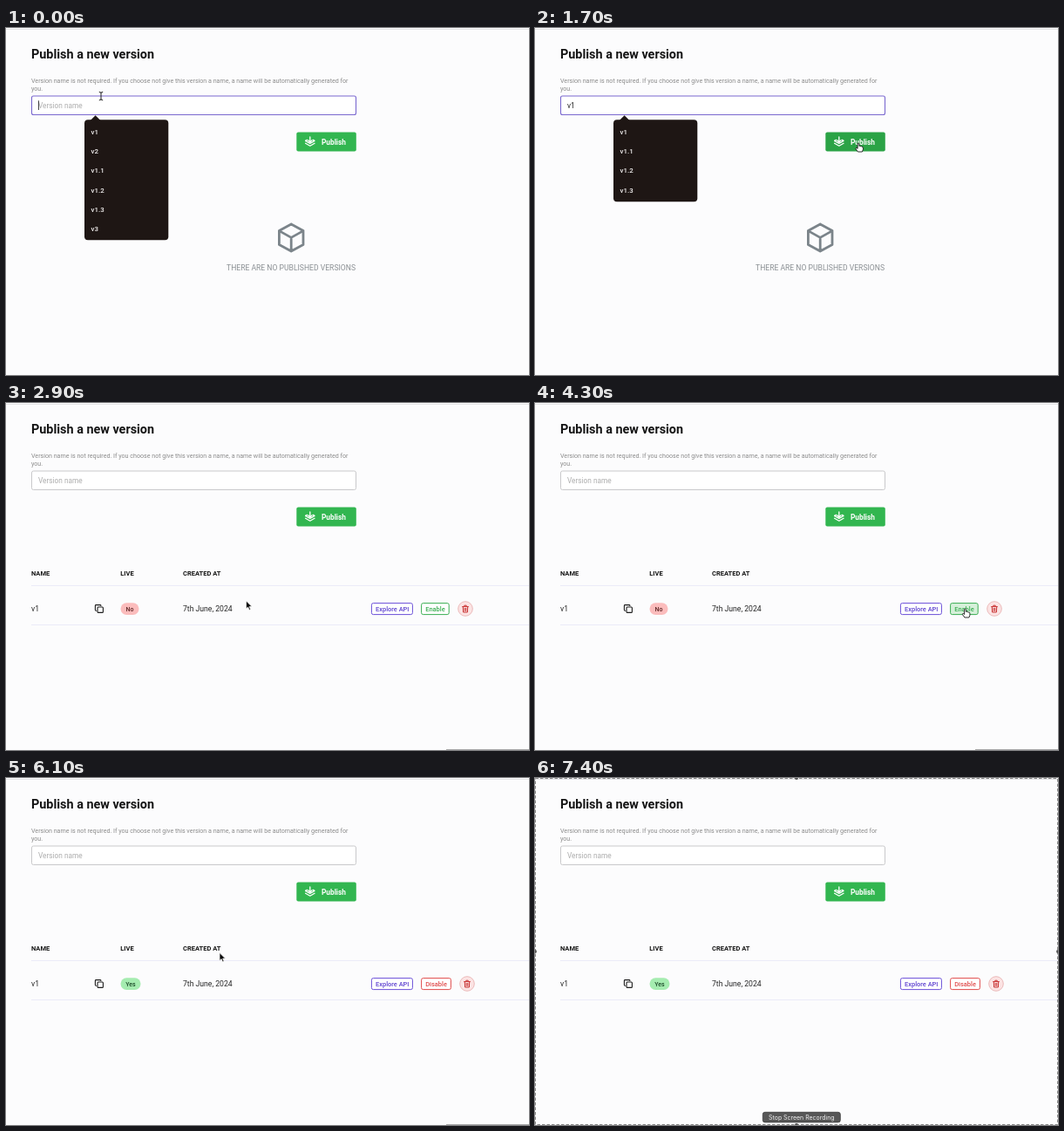
Write an HTML page that moves like this. It is 600 by 398 pixels and loops after 7500 ms.

```html
<!DOCTYPE html>
<html lang="en">
<head>
<meta charset="utf-8">
<title>Publish a new version</title>
<style>
html, body { margin: 0; width: 100%; height: 100%; overflow: hidden; background: #fcfcfd; }
svg { display: block; width: 600px; height: 398px; font-family: Roboto, "Open Sans", sans-serif; }
.title { font-size: 14.4px; font-weight: 700; fill: #151515; }
.hint { font-size: 7.11px; fill: #8b8b8b; }
.head { font-size: 7.5px; font-weight: 700; fill: #151515; }
.cell { font-size: 8.65px; fill: #252525; }
.field { font-size: 8.3px; }
.menu { font-size: 7.9px; font-weight: 500; fill: #f6f4f4; }
.btn { font-size: 7.45px; font-weight: 500; }
.line { fill: none; stroke-linecap: round; stroke-linejoin: round; }
</style>
</head>
<body>
<svg viewBox="0 0 600 398" xmlns="http://www.w3.org/2000/svg">
  <rect width="600" height="398" fill="#fcfcfd"/>
  <path d="M0 1.5H600" stroke="#e4e4e6"/>

  <text class="title" x="29" y="35">Publish a new version</text>
  <text class="hint" x="29" y="63.4">Version name is not required. If you choose not give this version a name, a name will be automatically generated for</text>
  <text class="hint" x="29" y="72.4">you.</text>

  <rect id="box" x="29.5" y="78" width="372" height="21.5" rx="2" fill="#fff"/>
  <text id="value" class="field" x="37" y="91.8"></text>
  <path id="caret" d="M0 83.3V94" stroke="#222" stroke-width=".9"/>

  <rect id="publish" x="333.3" y="119.5" width="68.5" height="22" rx="2"/>
  <g class="line" stroke="#fff" stroke-width="1.3">
    <path d="M348.8 125V130.6M346.4 128.6L348.8 131L351.2 128.6"/>
    <path d="M345.2 128.4L343.6 129.4L348.8 132.4L354 129.4L352.4 128.4M343.6 132.2L348.8 135.2L354 132.2"/>
  </g>
  <text x="362" y="133.7" font-size="8.3" font-weight="700" fill="#fff">Publish</text>

  <g id="empty">
    <path class="line" d="M327.2 225L341 232.6V248.6L327.2 256L313.4 248.6V232.6ZL341 232.6M313.4 232.6L327.2 240.4L341 232.6M327.2 240.4V256" stroke="#7b848a" stroke-width="2.8"/>
    <text x="253" y="277.6" font-size="8.6" fill="#8a8f93">THERE ARE NO PUBLISHED VERSIONS</text>
  </g>

  <g id="table">
    <text class="head" x="29" y="198">NAME</text>
    <text class="head" x="131.3" y="198">LIVE</text>
    <text class="head" x="203" y="198">CREATED AT</text>
    <path d="M29 209.5H600M29 254.5H600" stroke="#ebebf8"/>
    <text class="cell" x="29" y="239.3">v1</text>
    <text class="cell" x="203" y="239.3">7th June, 2024</text>
    <g class="line" stroke="#1d1d1d" stroke-width="1.1">
      <rect x="105" y="234" width="6.4" height="6.4" rx="1"/>
      <path d="M103.6 238.2H103.2Q102.4 238.2 102.4 237.3V232.5Q102.4 231.6 103.3 231.6H108Q108.9 231.6 108.9 232.5"/>
    </g>
    <rect id="pill" x="131.5" y="229.3" height="13.6" rx="6.8"/>
    <text id="live" class="btn" text-anchor="middle" y="238.8" style="font-size:7px"></text>
    <rect id="explore" x="419.4" y="229.6" width="47" height="13" rx="2" stroke="#6a4fd8"/>
    <text class="btn" x="424" y="238.8" fill="#5f43d0">Explore API</text>
    <rect id="toggle" x="476.6" y="229.6" height="13" rx="2"/>
    <text id="action" class="btn" x="481.2" y="238.8"></text>
    <g id="trash">
      <circle cy="236" r="8.3" fill="#fce4e4" stroke="#e9b4b4" stroke-width=".9"/>
      <path class="line" d="M-3.4 233.6H3.4M-1.2 233.4V232.2H1.2V233.4M-2.7 233.8L-2.4 240H2.4L2.7 233.8M-.8 235.4V238.4M.8 235.4V238.4" stroke="#c93434"/>
    </g>
  </g>

  <g id="menu">
    <rect id="panel" x="90" y="105.3" width="96.3" rx="4" fill="#1e1614"/>
    <path d="M96.8 106L102.6 100.2L108.4 106Z" fill="#1e1614"/>
    <g id="items"></g>
  </g>

  <path id="edge" d="M505 397.5H600" stroke="#aaa"/>

  <g id="overlay">
    <rect x=".5" y=".5" width="599" height="397" fill="none" stroke="#8a8a8a" stroke-dasharray="3.5 2"/>
    <g fill="#555">
      <circle cx="300" cy="0" r="2"/><circle cx="300" cy="398" r="2"/>
      <circle cx="0" cy="199" r="2"/><circle cx="600" cy="199" r="2"/>
    </g>
  </g>
  <g id="tip">
    <rect x="261.3" y="383.3" width="89" height="11.6" rx="2.5" fill="#575757" stroke="#3c3c3c" stroke-width=".8"/>
    <text x="305.8" y="391.7" text-anchor="middle" font-size="6.95" fill="#f4f4f4" style="font-family:Inter,sans-serif">Stop Screen Recording</text>
  </g>

  <g id="cursor">
    <path id="ibeam" class="line" d="M-1.8 -4.6Q0 -4.6 0 -3.4Q0 -4.6 1.8 -4.6M0 -3.6V3.8M-1.8 4.8Q0 4.8 0 3.6Q0 4.8 1.8 4.8" stroke="#222" stroke-width="1"/>
    <path id="arrow" d="M0 0V9L2.1 7.1L3.6 10.4L5.1 9.8L3.7 6.6H6.6Z" fill="#0b0b0b" stroke="#fff" stroke-width=".7"/>
    <path id="hand" d="M-.9 .5Q0 -.6 .9 .5V3.4Q2 2.6 2.7 3.8Q3.8 3.2 4.2 4.4Q5.4 4 5.4 5.4V7.4L4.4 10H-.6L-3.1 6.6Q-3.2 5.2 -1.8 5.6L-.9 6.4Z" fill="#fff" stroke="#161616" stroke-width=".9" stroke-linejoin="round"/>
  </g>
</svg>
<script>
const LOOP = 7500, STEP = 100;
const TYPE_V = 300, TYPE_1 = 500, CLOSE = 1800, PUBLISHED = 1900, EDGE = 2200;
const ENABLED = 4500, OVERLAY = 6400, TIP = 7200;

const $ = id => document.getElementById(id);
const show = (id, on) => { $(id).style.display = on ? "" : "none"; };
const set = (id, attrs) => {
  for (const k in attrs) $(id).setAttribute(k, attrs[k]);
};
const inside = (p, x, y, w, h) => p.x >= x && p.x <= x + w && p.y >= y && p.y <= y + h;

// time, x, y of the pointer
const path = [
  [0, 109, 78], [900, 109, 78], [1600, 371, 132], [2400, 371, 132],
  [2900, 275.5, 227], [3300, 275.5, 227], [4000, 493.5, 236],
  [4600, 493.5, 236], [5400, 245, 200.5], [6200, 245, 200.5], [7000, 306, 405]
];

function pointer(t) {
  const i = path.findIndex(k => k[0] > t);
  if (i < 0) return { x: 306, y: 405 };
  const [t0, x0, y0] = path[i - 1], [t1, x1, y1] = path[i];
  const u = (t - t0) / (t1 - t0), e = u * u * (3 - 2 * u);
  return { x: x0 + (x1 - x0) * e, y: y0 + (y1 - y0) * e };
}

function drawMenu(names) {
  set("panel", { height: 6 + 22 * names.length });
  $("items").innerHTML = names.map((n, i) =>
    `<text class="menu" x="97.6" y="${(121.6 + 22.3 * i).toFixed(1)}">${n}</text>`).join("");
}

function drawField(t) {
  const focus = t < CLOSE;
  const text = t < TYPE_V || t >= PUBLISHED ? "" : t < TYPE_1 ? "v" : "v1";
  set("box", { stroke: focus ? "#7a68cf" : "#c9c9cb", "stroke-width": focus ? 1.1 : 1 });
  $("value").textContent = text || "Version name";
  set("value", { fill: text ? "#222" : "#adadad" });
  show("caret", focus && (t < 1000 || t >= 1500 && t < 1700));
  set("caret", { transform: `translate(${37.4 + text.length * 4.4})` });
  show("menu", focus);
  if (focus) drawMenu(text === "v1" ? ["v1", "v1.1", "v1.2", "v1.3"] : ["v1", "v2", "v1.1", "v1.2", "v1.3", "v3"]);
}

function drawTable(t, overExplore, overToggle) {
  const on = t >= ENABLED;
  const color = on ? "#e04b4b" : "#3aae52";
  const tint = on ? "#fbdede" : "#d6f0da";
  show("empty", t < PUBLISHED);
  show("table", t >= PUBLISHED);
  set("pill", { width: on ? 23 : 21, fill: on ? "#a5ecb0" : "#fbbcbc" });
  set("live", { x: on ? 143 : 142, fill: on ? "#1c4a28" : "#5c2424" });
  $("live").textContent = on ? "Yes" : "No";
  set("explore", { fill: overExplore ? "#e6e0fa" : "#fff" });
  set("toggle", { width: on ? 33.8 : 31.6, stroke: color, fill: overToggle ? tint : "#fff" });
  set("action", { fill: color });
  $("action").textContent = on ? "Disable" : "Enable";
  set("trash", { transform: `translate(${on ? 529 : 527})` });
}

function draw(t) {
  const p = pointer(t);
  const live = t >= PUBLISHED;
  const overField = inside(p, 29, 77, 373, 23);
  const overPublish = inside(p, 333, 119, 69, 23);
  const overExplore = live && inside(p, 419, 229, 48, 14);
  const overToggle = live && inside(p, 476, 229, 34, 14);
  const hand = overPublish || overExplore || overToggle;

  drawField(t);
  drawTable(t, overExplore, overToggle);
  set("publish", { fill: overPublish ? "#2ba346" : "#32b650" });
  show("edge", t >= EDGE && t < OVERLAY);
  show("overlay", t >= OVERLAY);
  show("tip", t >= TIP);

  // the pointer hides while typing
  show("cursor", t < TYPE_V || t >= 900);
  set("cursor", { transform: `translate(${p.x.toFixed(2)} ${p.y.toFixed(2)})` });
  show("ibeam", overField);
  show("hand", hand);
  show("arrow", !overField && !hand);
}

const start = performance.now();
let last = -1;
function tick() {
  const t = Math.floor((performance.now() - start) % LOOP / STEP) * STEP;
  if (t !== last) draw(last = t);
  requestAnimationFrame(tick);
}
tick();
</script>
</body>
</html>
```
